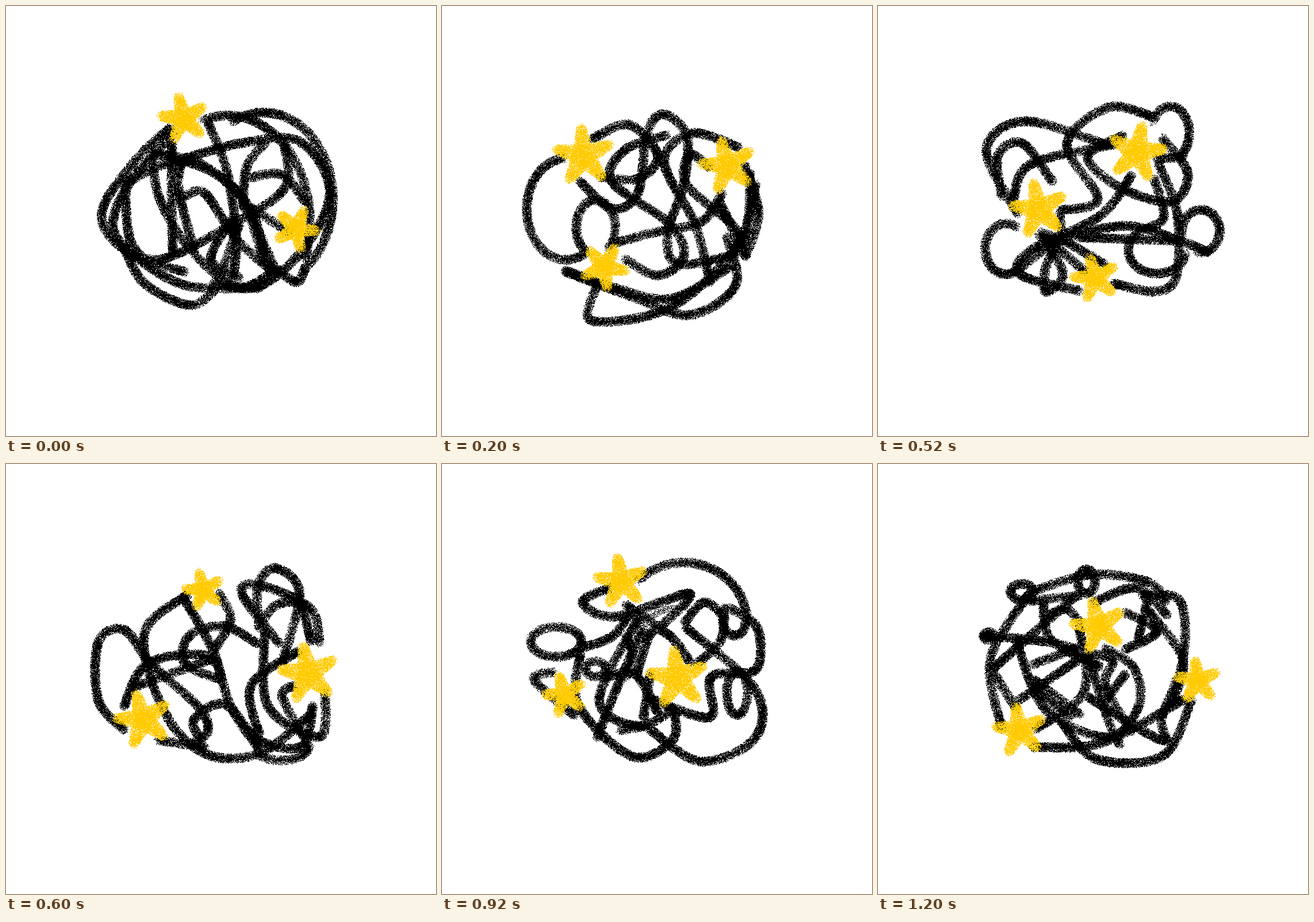
Recreate the animation shown at these times as an HTML page with a canvas. Size 748x748 px, loop 1.4 s.

```html
<!DOCTYPE html>
<html lang="en">
<head>
<meta charset="utf-8">
<title>Scribble and stars</title>
<style>
html, body { margin: 0; height: 100%; overflow: hidden; background: #fff; }
canvas { display: block; width: 100vw; height: 100vh; }
</style>
</head>
<body>
<canvas id="stage" width="748" height="748"></canvas>
<script>
const SIZE = 748, HOLD = 200, TAU = 2 * Math.PI, DEG = TAU / 360;
const BLACK = 0xff000000, WHITE = 0xffffffff, YELLOW = 0xff05cbff, OLIVE = 0xff009aa6;
const ctx = document.getElementById('stage').getContext('2d');
let pixels, seed = 7;

function random() {
  seed = seed + 0x6d2b79f5 | 0;
  let t = Math.imul(seed ^ seed >>> 15, 1 | seed);
  t = t + Math.imul(t ^ t >>> 7, 61 | t) ^ t;
  return ((t ^ t >>> 14) >>> 0) / 4294967296;
}

// One grain near (x, y); a larger falloff gathers grains at the centre.
function grain(x, y, radius, falloff, color) {
  const a = random() * TAU, r = radius * random() ** falloff;
  const i = Math.round(y + r * Math.sin(a)) * SIZE + Math.round(x + r * Math.cos(a));
  if (color === YELLOW && pixels[i] === BLACK && random() < .06) pixels[i] = OLIVE;
  else if (pixels[i] !== OLIVE) pixels[i] = color;
}

// Crayon mark along at(t), t from 0 to 1, with slowly changing pressure.
function crayon({ radius, density }, length, at) {
  const phase = random() * TAU;
  for (let d = 0; d < length; d++) {
    const [x, y] = at(d / length);
    const count = density * (1 + .25 * Math.sin(d / 37 + phase));
    for (let n = 0; n < count; n++) grain(x, y, radius, .65, BLACK);
  }
}

const spline = (a, b, c, d, t) =>
  b + t * (c - a + t * (2 * a - 5 * b + 4 * c - d + t * (3 * (b - c) + d - a))) / 2;

// Smooth line through the points x, y, x, y, ...
const pen = tip => (...p) => {
  const last = p.length / 2 - 1;
  const at = (i, k) => p[2 * Math.max(0, Math.min(last, i)) + k];
  for (let i = 0; i < last; i++) {
    const length = 1.1 * Math.hypot(at(i + 1, 0) - at(i, 0), at(i + 1, 1) - at(i, 1));
    crayon(tip, length, t =>
      [0, 1].map(k => spline(at(i - 1, k), at(i, k), at(i + 1, k), at(i + 2, k), t)));
  }
};
const plain = { radius: 8.7, density: 29 };
const line = pen(plain);
const thick = pen({ radius: 12, density: 45 });
const faint = pen({ radius: 7, density: 8 });

// Part of an ellipse, clockwise, in degrees from the right.
function arc(cx, cy, rx, ry, from = 0, to = 360) {
  crayon(plain, (to - from) * DEG * (rx + ry) / 2, t => {
    const a = (from + t * (to - from)) * DEG;
    return [cx + rx * Math.cos(a), cy + ry * Math.sin(a)];
  });
}

// Five tapered spokes, the first tilted clockwise from upright.
function star(cx, cy, size, tilt) {
  for (let n = 0; n < 240 * size; n++) {
    const a = (tilt + n % 5 * 72 - 90) * DEG, t = random(), r = t * size;
    grain(cx + r * Math.cos(a), cy + r * Math.sin(a), .42 * size * (1 - t) + 9 * t, .5, YELLOW);
  }
}

const scenes = [
  () => {
    arc(448, 335, 120, 150, 243, 415);
    line(520,455, 505,480, 472,458);
    arc(385, 375, 143, 185, 253, 380);
    line(310,265, 410,238, 510,235, 563,320, 520,418, 440,487, 360,482);
    line(285,212, 225,268, 166,360, 210,427, 310,462);
    line(290,222, 213,310, 185,380, 210,425);
    line(205,308, 300,270, 390,310, 435,385, 468,460);
    line(265,258, 340,275, 420,345, 450,435);
    line(207,310, 217,410, 270,440, 400,375, 485,315, 484,240);
    line(255,250, 265,330, 318,420, 400,488, 465,462);
    line(288,240, 288,350, 290,430);
    line(305,270, 300,320, 327,425);
    line(308,332, 345,325, 400,405, 465,462);
    line(350,200, 383,285, 400,400, 395,470);
    line(412,350, 418,280, 450,238);
    line(425,298, 480,293, 520,340);
    line(392,370, 356,440, 405,472);
    line(405,380, 375,462);
    line(205,420, 240,482, 318,520, 362,495);
    line(215,430, 310,485, 440,490);
    line(425,350, 490,392);
    line(420,350, 450,450);
    star(308, 195, 39, -12);
    star(504, 387, 35, 24);
  },
  () => {
    arc(215, 353, 68, 88, 60, 265);
    arc(267, 385, 34, 48, 120, 410);
    line(240,305, 295,352, 340,325, 356,220, 385,188, 425,225, 420,310, 392,395, 410,448, 510,432);
    line(262,230, 325,206, 375,260, 340,300, 275,297);
    line(390,224, 318,250, 295,305, 395,378, 420,435, 375,468, 318,440);
    line(300,412, 370,393, 450,375, 487,325);
    line(515,245, 435,221, 386,270, 440,380, 466,480);
    line(465,280, 430,258, 425,310, 500,375, 522,405);
    line(525,275, 550,360, 527,435);
    line(535,290, 520,405, 400,522, 260,547, 270,485);
    line(545,310, 522,420);
    line(215,460, 300,490, 400,508, 505,450);
    line(215,462, 330,505, 430,537, 510,485, 495,400);
    line(482,340, 528,435);
    star(246, 260, 48, -5);
    star(496, 277, 45, -14);
    star(282, 453, 37, 29);
  },
  () => {
    line(242,360, 188,250, 255,200, 400,242);
    line(215,330, 208,260, 250,238, 303,305);
    line(235,335, 265,275, 410,240);
    line(318,355, 382,335, 328,240, 400,176, 477,192);
    arc(508, 220, 33, 46, 205, 420);
    line(530,262, 485,265);
    line(425,225, 364,262, 420,315, 510,340, 538,290, 495,230);
    line(440,295, 385,365, 265,425, 248,467, 350,495);
    line(488,275, 520,360, 518,470, 480,496, 410,482);
    line(300,408, 430,382, 530,410, 573,428);
    arc(561, 391, 33, 37, -190, 100);
    arc(485, 424, 50, 41, 10, 250);
    line(468,386, 497,365, 480,300);
    line(350,402, 520,408);
    arc(222, 422, 36, 44, 60, 300);
    line(238,462, 305,410);
    line(285,398, 321,465, 292,497, 290,460, 305,425);
    line(295,405, 360,462);
    line(320,405, 392,448);
    line(318,390, 316,360);
    thick(282,397, 315,408);
    star(279, 353, 46, -11);
    star(450, 254, 47, 11);
    star(377, 473, 37, -14);
  },
  () => {
    line(205,462, 160,410, 160,310, 205,288, 252,347, 335,423, 350,465, 320,487);
    line(315,227, 240,295, 275,430, 345,503, 440,503, 530,435);
    line(205,420, 245,347, 345,332, 372,372, 310,345, 320,297, 380,282, 437,312);
    line(220,388, 360,338);
    line(310,235, 360,325, 390,420, 440,495);
    line(370,225, 390,270, 362,322);
    line(265,480, 345,492);
    line(340,480, 326,445, 380,417, 440,480, 515,490, 533,420);
    arc(478, 490, 48, 25, 0, 150);
    line(440,470, 426,385, 508,325);
    line(545,310, 528,250, 440,210, 410,225, 475,312);
    line(440,285, 438,210, 470,181, 510,225, 480,345);
    line(443,275, 470,245, 510,245, 530,308);
    line(450,290, 455,420, 545,474, 555,400);
    line(500,385, 480,405, 522,480);
    star(343, 219, 31, -14);
    star(525, 364, 48, -10);
    star(238, 444, 46, -15);
  },
  () => {
    arc(420, 275, 110, 104, 225, 360);
    arc(508, 272, 20, 26, 0, 200);
    line(488,262, 455,240, 422,275);
    line(500,250, 548,285, 545,357, 468,370, 465,440, 355,405);
    line(425,285, 543,390, 545,475, 450,517, 362,462);
    arc(513, 398, 18, 38);
    line(290,215, 244,240, 300,265, 430,225, 380,282);
    line(320,245, 395,298, 432,345);
    arc(198, 309, 44, 26);
    line(240,320, 295,300, 325,262);
    line(192,362, 160,375, 230,437);
    line(240,330, 237,420, 330,508, 400,480, 405,430);
    line(490,250, 485,305, 445,345);
    line(338,365, 365,291, 400,300);
    line(340,270, 273,410, 340,455, 405,425);
    line(350,285, 303,390, 270,475);
    arc(267, 356, 18, 13);
    line(280,372, 335,365, 375,432);
    line(350,440, 362,365);
    line(320,300, 330,330, 320,370);
    faint(345,272, 385,254, 425,248);
    line(310,463, 355,455);
    star(311, 204, 42, -8);
    star(409, 372, 49, -7);
    star(213, 401, 34, -17);
  },
  () => {
    line(240,360, 232,255, 300,197, 360,240, 320,340, 245,395);
    line(178,375, 213,295, 275,290, 310,345);
    line(216,365, 243,277, 300,290, 300,400, 242,432);
    line(285,275, 272,350, 345,440, 326,510);
    thick(327,510, 330,530);
    line(210,430, 328,507);
    line(240,440, 350,460, 430,493, 475,490);
    line(350,260, 306,242, 358,375, 345,400, 315,345);
    line(368,245, 395,195);
    line(430,177, 457,200, 400,290, 430,345, 540,382, 553,460, 525,487);
    line(360,240, 450,293, 540,308, 567,250, 505,199, 483,242, 517,310, 440,352, 375,352);
    line(500,325, 490,263, 546,285, 540,368, 420,378, 378,335, 450,294);
    line(420,250, 485,290, 530,410);
    line(345,440, 425,387, 515,400);
    line(455,387, 455,430);
    line(400,475, 385,425, 430,392);
    line(248,400, 300,405);
    thick(362,250, 340,300, 312,350);
    thick(490,318, 525,372);
    star(417, 206, 42, -5);
    star(490, 453, 48, -18);
    star(207, 396, 41, -16);
  },
  () => {
    line(265,222, 370,192, 470,205, 500,240);
    line(260,228, 195,340, 215,460);
    arc(250, 222, 20, 14);
    line(265,238, 350,228);
    arc(362, 204, 15, 21);
    line(270,492, 390,484, 530,410);
    line(320,450, 380,513, 495,507, 545,410);
    line(460,228, 525,238, 530,340, 493,440, 493,480, 365,405);
    line(375,240, 450,215, 502,262);
    line(340,232, 200,355);
    line(200,362, 240,425);
    line(182,298, 290,308, 345,322);
    arc(192, 299, 9, 7);
    line(240,305, 290,425, 400,475, 453,420, 445,355, 395,320);
    line(287,240, 300,305, 385,352);
    line(350,275, 328,252, 295,262);
    line(350,285, 358,395, 275,460);
    line(245,410, 345,342);
    line(270,348, 345,320);
    line(272,375, 350,435);
    line(270,390, 335,440);
    line(365,330, 398,440, 420,488);
    line(372,330, 408,342, 395,385, 440,465);
    line(430,258, 485,290, 430,322);
    line(470,230, 452,305);
    line(470,255, 530,340, 508,418);
    line(395,410, 430,365);
    star(383, 281, 44, -14);
    star(555, 377, 35, -6);
    star(246, 463, 42, -9);
  },
];

const images = scenes.map(draw => {
  const image = new ImageData(SIZE, SIZE);
  pixels = new Uint32Array(image.data.buffer).fill(WHITE);
  draw();
  return image;
});

function show() {
  ctx.putImageData(images[Math.floor(performance.now() / HOLD) % images.length], 0, 0);
  requestAnimationFrame(show);
}
show();
</script>
</body>
</html>
```
